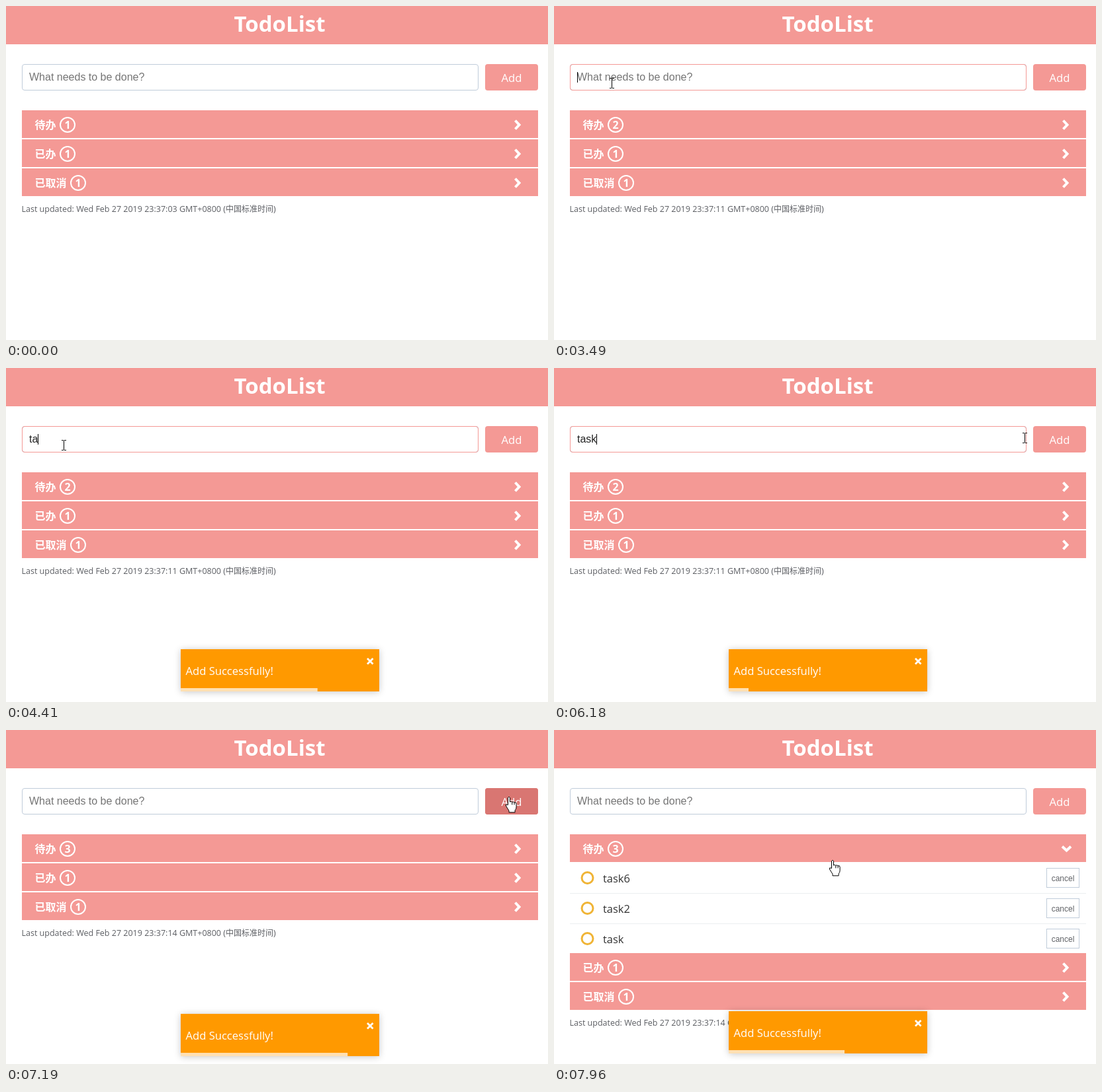
These frames come from a looping animation (819x506 px, 8000 ms). An HTML page with a canvas:

```html
<!DOCTYPE html>
<html lang="zh-CN">
<head>
<meta charset="utf-8">
<title>TodoList</title>
<style>
html, body { margin: 0; width: 100%; height: 100%; overflow: hidden; background: #fff; }
canvas { display: block; }
</style>
</head>
<body>
<canvas id="stage" width="819" height="506"></canvas>
<script>
const ctx = document.getElementById('stage').getContext('2d');
const PINK = '#f49995', GREY = '#c0ccda', ORANGE = '#ff9900';
const UI = '"Open Sans", "Noto Sans", sans-serif';
const ARIAL = '"Liberation Sans", Arial, sans-serif';
const CJK = '"Noto Sans CJK SC", "Noto Sans CJK", sans-serif';
const LOOP = 8000, TOASTS = [3480, 6710];

// [start, step] of each stretch of screen updates, in ms
const RUNS = [[0, 1e4], [330, 78], [1110, 10], [3490, 1e4], [3720, 77], [4560, 77],
  [5410, 77], [6250, 78], [7110, 78], [7960, 78]];
const TYPED = [[1110, ''], [1710, 't'], [1860, 'ta'], [2330, 'tas'], [2490, 'task'],
  [3210, 'task2'], [3490, ''], [4180, 't'], [4360, 'ta'], [4850, 'tas'], [5050, 'task'], [6710, '']];
const POINTER = [[330, 476, 384], [560, 330, 297], [720, 222, 237], [876, 125, 190],
  [1033, 87, 117], [5795, 87, 117], [5872, 200, 88], [5949, 350, 62], [6026, 494, 53],
  [6103, 617, 82], [6180, 711, 106], [6406, 764, 97], [7110, 764, 97], [7266, 755, 104],
  [7422, 637, 122], [7500, 580, 145], [7600, 500, 170], [7734, 466, 179],
  [7880, 440, 188], [7960, 421, 197]];
const BOUNCE_IN = [[0, -3000], [.6, 25], [.75, -10], [.9, 5], [1, 0]];
const BOUNCE_OUT = [[0, 0], [.2, 10], [.4, -20], [.45, -20], [1, 2000]];

const clamp = v => Math.max(0, Math.min(1, v));
const ramp = (t, a, b) => clamp((t - a) / (b - a));
const latest = (list, t) => list.filter(e => e[0] <= t).pop();

function snap(t) {
  const [start, step] = latest(RUNS, t);
  return start + Math.floor((t - start) / step + .18) * step;
}

function bezier(x1, y1, x2, y2) {
  const at = (a, b, s) => 3 * (1 - s) * (1 - s) * s * a + 3 * (1 - s) * s * s * b + s * s * s;
  return x => {
    let lo = 0, hi = 1;
    for (let i = 0; i < 24; i++) {
      const mid = (lo + hi) / 2;
      if (at(x1, x2, mid) < x) lo = mid; else hi = mid;
    }
    return at(y1, y2, lo);
  };
}
const easeIn = bezier(.215, .61, .355, 1), ease = bezier(.25, .1, .25, 1);

// Interpolates every value after the first of each key
function along(keys, t, curve = u => u) {
  const i = keys.findIndex(k => k[0] > t);
  if (i < 0) return keys[keys.length - 1].slice(1);
  const a = keys[i - 1], b = keys[i], u = curve(ramp(t, a[0], b[0]));
  return a.slice(1).map((v, j) => v + (b[j + 1] - v) * u);
}

function text(str, x, y, font, color, align = 'left') {
  ctx.font = font;
  ctx.fillStyle = color;
  ctx.textAlign = align;
  ctx.fillText(str, x, y);
}

function rect(x, y, w, h, color) {
  ctx.fillStyle = color;
  ctx.fillRect(x, y, w, h);
}

function rounded(x, y, w, h, r) {
  ctx.beginPath();
  ctx.roundRect(x, y, w, h, r);
}

function stroke(color, width, path) {
  ctx.strokeStyle = color;
  ctx.lineWidth = width;
  path ? ctx.stroke(new Path2D(path)) : ctx.stroke();
}

function ring(x, y, r, color, width) {
  ctx.beginPath();
  ctx.arc(x, y, r, 0, 7);
  stroke(color, width);
}

function drawForm(t) {
  const focus = ramp(t, 1110, 1260) * (1 - ramp(t, 6640, 6790));
  rounded(24.5, 88.5, 689, 39, 3.5);
  stroke(GREY, 1);
  ctx.globalAlpha = focus;
  stroke(PINK, 1);
  ctx.globalAlpha = 1;

  const [since, value] = latest(TYPED, t) || [0, ''];
  text(value || 'What needs to be done?', 35, 113, '16px ' + ARIAL, value ? '#222' : '#757575');
  const blinkOn = Math.floor((t - since) / 525) % 2 === 0;
  if (t >= 1110 && t < 6640 && blinkOn) {
    rect(35 + Math.floor(value && ctx.measureText(value).width), 100, 1, 16, '#000');
  }

  rounded(724, 88, 80, 40, 4);
  ctx.fillStyle = PINK;
  ctx.fill();
  ctx.globalAlpha = ramp(t, 6300, 6450) * (1 - ramp(t, 7270, 7420));
  ctx.fillStyle = '#d97672';
  ctx.fill();
  ctx.globalAlpha = 1;
  text('Add', 764, 115, '16.7px ' + UI, '#fff', 'center');
}

function drawGroup(label, count, y, open) {
  rect(24, y, 780, 42, PINK);
  text(label, 43.5, y + 28, 'bold 16px ' + CJK, '#fff');
  const x = 61 + label.length * 16;
  ring(x, y + 22, 11, '#fff', 2);
  text(count, x, y + 28, 'bold 16px ' + UI, '#fff', 'center');
  ctx.save();
  ctx.translate(open ? 774.5 : 773, y + 22);
  if (open) ctx.rotate(Math.PI / 2);
  stroke('#fff', 4, 'M-3.5-6.500L2.500 0-3.500 6.500');
  ctx.restore();
}

function drawItem(name, i) {
  const y = 201 + i * 46;
  ring(50.5, y + 23, 8.5, '#f0b435', 3);
  text(name, 74, y + 30, '16.5px ' + UI, '#333');
  ctx.strokeStyle = GREY;
  ctx.lineWidth = 1;
  ctx.strokeRect(744.5, y + 8.5, 49, 29);
  text('cancel', 769, y + 28, '12px ' + ARIAL, '#606266', 'center');
  if (i < 2) rect(24, y + 46, 780, 1, '#ebeef0');
}

function drawLists(t) {
  const added = TOASTS.filter(s => t >= s).length;
  const open = t >= 7955, shift = open ? 136 : 0;
  drawGroup('待办', 1 + added, 158, open);
  if (open) ['task6', 'task2', 'task'].forEach(drawItem);
  drawGroup('已办', 1, 202 + shift, false);
  drawGroup('已取消', 1, 246 + shift, false);

  const y = 312 + shift, color = '#5c5e63';
  const seconds = ['03', '11', '14'][added];
  text(`Last updated: Wed Feb 27 2019 23:37:${seconds} GMT+0800 (`, 23.5, y, '12.5px ' + UI, color);
  text('中国标准时间', 332, y, '12px ' + CJK, color);
  text(')', 404, y, '12.5px ' + UI, color);
}

function drawToast(age) {
  if (age < 0 || age >= 3760) return;
  const [dy] = age < 3010
    ? along(BOUNCE_IN, age / 750, easeIn)
    : along(BOUNCE_OUT, (age - 3010) / 750, ease);
  ctx.save();
  ctx.translate(264, 426 + dy);
  ctx.globalAlpha = 1 - Math.max(0, Math.abs(dy) - 30) / 3000;
  ctx.shadowColor = 'rgba(0,0,0,.22)';
  ctx.shadowBlur = 10;
  ctx.shadowOffsetY = 1;
  rect(0, 0, 300, 64, ORANGE);
  ctx.shadowColor = 'transparent';
  text('Add Successfully!', 7.5, 39, '16.6px ' + UI, '#fff');
  stroke('#fff', 2.8, 'M282 14l8.500 8.500M290.500 14l-8.500 8.500');
  rect(0, 59, 300 * (1 - clamp(age / 3000)), 5, 'rgba(255,255,255,.7)');
  ctx.restore();
}

const HAND = new Path2D('M-1.5 12.5V1.5q1.5-2.5 3 0V8q2-1.5 3.3.3 2-1.3 3.3.5 3-1 3 2v5' +
  'q0 3-2 5v3H0v-2.500L-4.500 14q-1-3 1.500-2zM4.800 8.300v4M8.100 8.800v3.500');
const ARROW = new Path2D('M.5.5v16l3.700-3.500 2.500 6 2.500-1-2.500-5.800h5z');

function drawPointer(t) {
  if (t < 330) return;
  const [x, y] = along(POINTER, t).map(Math.round);
  const inForm = y >= 88 && y < 128;
  ctx.save();
  ctx.translate(x, y);
  if (inForm && x >= 24 && x < 714) {
    stroke('#000', 1, 'M.5-7V7M-3-7.500H0M1-7.500H4M-3 7.500H0M1 7.500H4');
  } else {
    const clickable = inForm && x >= 724 && x < 804 || y >= 158 && y < 288 && x >= 24 && x < 804;
    const shape = clickable ? HAND : ARROW;
    ctx.fillStyle = '#fff';
    ctx.fill(shape);
    ctx.strokeStyle = '#000';
    ctx.lineWidth = 1;
    ctx.stroke(shape);
  }
  ctx.restore();
}

function frame() {
  const t = snap(performance.now() % LOOP);
  rect(0, 0, 819, 506, '#fff');
  rect(0, 0, 819, 58, PINK);
  text('TodoList', 413.5, 39, 'bold 33px ' + UI, '#fff', 'center');
  drawForm(t);
  drawLists(t);
  TOASTS.forEach(start => drawToast(t - start));
  drawPointer(t);
  requestAnimationFrame(frame);
}
frame();
</script>
</body>
</html>
```
